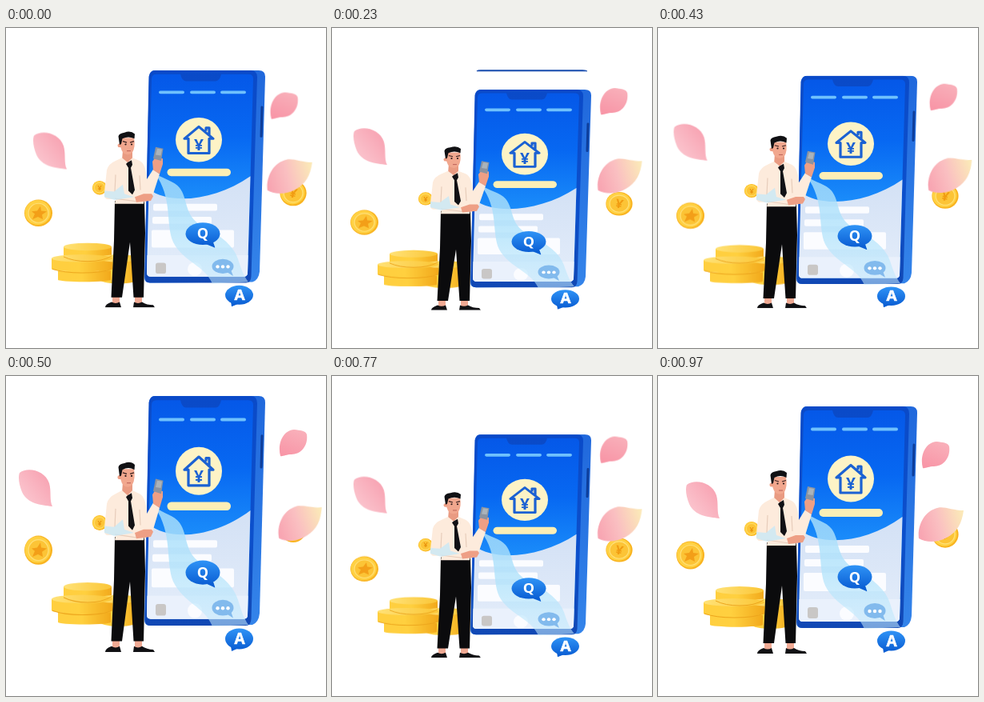
An HTML page for the animation above (2010 ms loop, 400 by 400 pixels).

```html
<!DOCTYPE html>
<html lang="en">
<head>
<meta charset="utf-8">
<title>Mobile housing service</title>
<style>
  html, body { margin: 0; width: 100%; height: 100%; overflow: hidden; background: #fff; }
  svg { display: block; width: 100vw; height: 100vh; }
  text { font-family: "Open Sans", "Noto Sans", sans-serif; font-weight: 700; text-anchor: middle; }

  /* The scene stretches and squashes from the floor, at 30 poses a second. */
  .scene { transform-origin: 200px 400px; animation: bounce 2010ms infinite; }
  @keyframes bounce {
    0%       { transform: scaleY(.9586); animation-timing-function: steps(4); }
    6.4677%  { transform: scaleY(.911);  animation-timing-function: steps(4); }
    13.433%  { transform: scaleY(.874);  animation-timing-function: steps(2); }
    16.4179% { transform: scaleY(.876);  animation-timing-function: steps(5); }
    24.8756% { transform: scaleY(1.036); animation-timing-function: steps(1); }
    26.3681% { transform: scaleY(1.055); animation-timing-function: steps(3); }
    31.3432% { transform: scaleY(1);     animation-timing-function: steps(4); }
    38.3084% { transform: scaleY(.903);  animation-timing-function: steps(1); }
    39.801%  { transform: scaleY(.9);    animation-timing-function: steps(5); }
    48.2587%, 100% { transform: scaleY(1); }
  }

  .petal { animation: drift 2010ms infinite; }
  @keyframes drift {
    0%       { transform: translate(calc(var(--dx) * .05), calc(var(--dy) * .1)); animation-timing-function: steps(15); }
    24.8756% { transform: translate(var(--dx), var(--dy)) rotate(var(--turn, 0deg)); animation-timing-function: steps(14); }
    48.2587%, 100% { transform: none; }
  }
  .turning { --turn: -4deg; transform-origin: 354px 186px; }

  .trail { animation: trail 2010ms step-end infinite; }
  @keyframes trail {
    0%       { opacity: 0; }
    1.4925%  { opacity: 1; }
    21.393%, 100% { opacity: 0; }
  }
</style>
</head>
<body>
<svg viewBox="0 0 400 400">
  <defs>
    <linearGradient id="screen" gradientUnits="userSpaceOnUse" x1="0" y1="43" x2="0" y2="205">
      <stop offset="0" stop-color="#0558e8"/><stop offset=".5" stop-color="#0768f2"/><stop offset="1" stop-color="#1a8cfa"/>
    </linearGradient>
    <linearGradient id="body" x1="0" y1="0" x2="0" y2="1">
      <stop offset="0" stop-color="#0a4ac8"/><stop offset=".6" stop-color="#0c50cc"/><stop offset="1" stop-color="#1148b4"/>
    </linearGradient>
    <linearGradient id="edge" x1="0" y1="0" x2="0" y2="1">
      <stop offset="0" stop-color="#2068dc"/><stop offset="1" stop-color="#3484ea"/>
    </linearGradient>
    <linearGradient id="panel" x1="0" y1="0" x2="0" y2="1">
      <stop offset="0" stop-color="#d3e1f5"/><stop offset="1" stop-color="#e4edfa"/>
    </linearGradient>
    <linearGradient id="bubble" x1="0" y1="0" x2="0" y2="1">
      <stop offset="0" stop-color="#2f93f6"/><stop offset="1" stop-color="#0b5fd4"/>
    </linearGradient>
    <linearGradient id="beam" x1="0" y1="0" x2="0" y2="1">
      <stop offset="0" stop-color="#a3dcfb" stop-opacity=".85"/><stop offset=".5" stop-color="#b4e4fb" stop-opacity=".8"/><stop offset="1" stop-color="#c4e9fc" stop-opacity=".55"/>
    </linearGradient>
    <linearGradient id="side">
      <stop offset="0" stop-color="#ffcf3f"/><stop offset=".45" stop-color="#ffd03f"/><stop offset="1" stop-color="#f2a91b"/>
    </linearGradient>
    <linearGradient id="top">
      <stop offset="0" stop-color="#ffe277"/><stop offset="1" stop-color="#fbc636"/>
    </linearGradient>
    <linearGradient id="pinkDown" x1=".2" y1=".9" x2=".9" y2=".3">
      <stop offset="0" stop-color="#fbc6cf"/><stop offset="1" stop-color="#f8a5b4"/>
    </linearGradient>
    <linearGradient id="pinkUp" x1=".7" y1="0" x2=".3" y2="1">
      <stop offset="0" stop-color="#f9b0ba"/><stop offset="1" stop-color="#f896a7"/>
    </linearGradient>
    <linearGradient id="pinkCream" x1="0" y1=".6" x2="1" y2=".4">
      <stop offset="0" stop-color="#f8a5b2"/><stop offset=".45" stop-color="#fabfc1"/><stop offset="1" stop-color="#fbe8b8"/>
    </linearGradient>
    <g id="coin">
      <circle r="17.500" fill="#f9b420"/>
      <circle cx="-.8" cy="-.6" r="16" fill="#ffd143"/>
      <circle r="12.500" fill="#fcc436" stroke="#ffe07a" stroke-width="1.2"/>
    </g>
    <path id="disc" d="M-1 0V1A1 .22 0 0 0 1 1V0Z"/>
  </defs>

  <path class="trail" d="M181 53.5Q182 52.5 186 52.5H313Q318 52.5 319 54H181Z" fill="#1d4fb0" stroke="#1d4fb0" stroke-width=".6"/>

  <g class="scene">
    <!-- phone -->
    <path d="M186 38H316Q324 38 324 46L317 300Q316 311 308 314L180 315Q173 315 173 308L179 46Q180 38 186 38Z" fill="url(#edge)"/>
    <path d="M186 38H306Q314 38 314 47L306.500 307Q306 315 300 315H180Q173 315 173.500 307L178.500 46Q180 38 186 38Z" fill="url(#body)"/>
    <path d="M320 86L319 124" stroke="#0d3d9a" stroke-width="3" stroke-linecap="round"/>
    <path d="M188 43H218Q220 52 225 52H262Q267 52 269 43H303Q309 43 309 49L302 302Q302 307 297 307H181Q176 307 176 302L182 49Q182 43 188 43Z" fill="url(#screen)"/>
    <path d="M178.500 193C205 214 262 208 305.500 176L302 302Q302 307 297 307H181Q176 307 176 302Z" fill="url(#panel)"/>
    <path d="M176.500 279H302.500L302 302Q302 307 297 307H181Q176 307 176 302Z" fill="#eaf1fc"/>
    <path d="M193 66.500H221M232 66.500H260M270 66.500H298" stroke="#6fc1fd" stroke-width="4" stroke-linecap="round"/>
    <circle cx="241" cy="128.500" r="29" fill="#fdf3c6"/>
    <path d="M228 127H223L241 111.500L259 127H254V146H228ZM250 117V113H254V122" fill="none" stroke="#1b61d3" stroke-width="3.200" stroke-linejoin="round"/>
    <text x="241" y="142" font-size="21" fill="#1b61d3">¥</text>
    <rect x="201.500" y="166" width="79.500" height="10" rx="5" fill="#fcefb6"/>
    <g fill="#fbfcff">
      <rect x="184" y="212" width="80" height="9" rx="2"/>
      <rect x="183" y="229" width="74" height="9" rx="2"/>
      <rect x="182" y="246" width="103" height="23" rx="2"/>
      <circle cx="236" cy="297" r="9"/>
    </g>
    <rect x="187" y="289" width="13" height="14" rx="3" fill="#c9c7c6"/>

    <!-- light from the handset -->
    <path d="M186 172C197 180 210 182 217 191C228 206 222 226 244 240C270 254 285 268 290 284C294 297 297 306 303 314L258 316C248 292 222 288 209 262C199 238 209 205 186 172Z" fill="url(#beam)"/>

    <!-- speech bubbles -->
    <path d="M259 262L261 268Q262 270 259.500 268.500L249 264Z" fill="#0b5fd4"/>
    <ellipse cx="246" cy="251" rx="21.500" ry="14.500" fill="url(#bubble)"/>
    <text x="246" y="257.500" font-size="18" fill="#fff">Q</text>
    <path d="M276 301L284 306L281 298Z" fill="#82baed"/>
    <ellipse cx="271" cy="293.500" rx="13.500" ry="9.500" fill="#82baed"/>
    <g fill="#fff"><circle cx="264.500" cy="294" r="2.200"/><circle cx="271" cy="294" r="2.200"/><circle cx="277.500" cy="294" r="2.200"/></g>
    <path d="M281 339L282 346L291 342Z" fill="#0b5fd4"/>
    <ellipse cx="291.500" cy="331" rx="17.500" ry="12.500" fill="url(#bubble)"/>
    <text x="292" y="337.500" font-size="19" fill="#fff" stroke="#fff" stroke-width=".6">A</text>

    <!-- gold -->
    <g fill="url(#side)">
      <use href="#disc" transform="translate(141 283) scale(25 27)"/>
      <use href="#disc" transform="translate(98 299) scale(33 12)"/>
      <use href="#disc" transform="translate(95 283) scale(38 14)"/>
      <use href="#disc" transform="translate(102 268) scale(30 13)"/>
    </g>
    <g fill="url(#top)">
      <ellipse cx="141" cy="283" rx="25" ry="5"/>
      <ellipse cx="95" cy="283" rx="38" ry="5"/>
      <ellipse cx="102" cy="268" rx="30" ry="5"/>
    </g>
    <path d="M72 281Q84 287 102 287Q121 287 132 280M58 297Q72 302 95 302Q121 302 132 297" fill="none" stroke="#eda51c" stroke-width="1"/>
    <use href="#coin" transform="translate(40.500 224)"/>
    <path d="M43 215L44 221L51 222L45 226L46 232L40 229L33 232L36 225L32 222L39 221Z" fill="#f39f18"/>
    <use href="#coin" transform="translate(359 198) scale(.95)"/>
    <text x="359" y="204" font-size="17" fill="#f19c12" transform="rotate(12 359 198)">¥</text>
    <use href="#coin" transform="translate(117 191) scale(.52)"/>
    <text x="117" y="194.500" font-size="9" fill="#e9930f">¥</text>

    <!-- man -->
    <path d="M133 330H142V343H133ZM161 330H170V343H161Z" fill="#f0aa94"/>
    <path d="M136 208H173L174 250L172 334H159.500L155 262L145 334H131.500L135 260Z" fill="#0b0b0d"/>
    <path d="M132 340Q137 343 142 340L144 347H124Q124 343 132 340ZM160 340Q165 343 170 340Q176 344 184 344L186 347H159Z" fill="#111114"/>
    <path d="M146 142H158V155L152 160L145 155Z" fill="#e99b82"/>
    <path d="M145 152L152 158L158 152L167 156Q175 160 176 180L184 167L192 173L184 199Q181 205 173 206L172 212H136L137 206L126 206Q122 204 123 198L126 168Q128 160 137 156Z" fill="#fdebdc"/>
    <path d="M137 174L136 196M167 175L168 194M136 205L164 209" fill="none" stroke="#e7cdbb" stroke-width="1.200"/>
    <path d="M152 158L157 155L158 161L156 165L161 194L158 200L153 195V165L150 160Z" fill="#111115"/>
    <path d="M123 195L135 196L146 187L148 199L160 203L136 207L123 203Z" fill="#c6e9f8" opacity=".75"/>
    <path d="M161 203L172 199L182 199L184 202L181 208L163 210Z" fill="#ee9f85"/>
    <path d="M184 168L183 157L187 151L196 153L196 160L192 173Z" fill="#ee9f85"/>
    <path d="M187 138L196.500 140L194 156L184 153Z" fill="#8b93a0"/>
    <path d="M189 140L195 141L193.500 149L187 148Z" fill="#aab3ba"/>
    <path d="M142 126H160Q162 138 158 145Q153 150 147 146Q142 141 142 126Z" fill="#f1a78e"/>
    <circle cx="142" cy="136" r="2.500" fill="#ee9f85"/>
    <path d="M142 135L140.500 124Q141 120 148 119Q156 116 161 121L160.500 127Q153 123 145.500 127L144 134Z" fill="#111114"/>
    <path d="M146 130.500L151 132M155 132L160 130.500" stroke="#3b2322" stroke-width="1.200"/>
    <circle cx="149.500" cy="134.500" r="1.100" fill="#2b1a1a"/>
    <circle cx="157" cy="134.500" r="1.100" fill="#2b1a1a"/>
    <path d="M151 143H156" stroke="#ba5f56" stroke-width="1"/>
  </g>

  <!-- petals -->
  <g class="petal" style="--dx: -19px; --dy: -15px">
    <path d="M36 136C46 128 68 133 73 149C76 160 73 170 77 178C62 176 46 175 39 160C35 150 34 141 36 136Z" fill="url(#pinkDown)"/>
  </g>
  <g class="petal" style="--dx: 12px; --dy: -15px">
    <path d="M331 115C327 100 334 83 348 82C356 83 362 83 364 88C366 103 356 113 345 113C338 113 334 116 331 115Z" fill="url(#pinkUp)"/>
  </g>
  <g class="petal turning" style="--dx: 14px; --dy: -2px">
    <path d="M326 203C324 188 332 171 346 166C356 161 366 168 382 168C380 184 374 195 361 202C350 208 336 209 326 203Z" fill="url(#pinkCream)"/>
  </g>
</svg>
</body>
</html>
```
